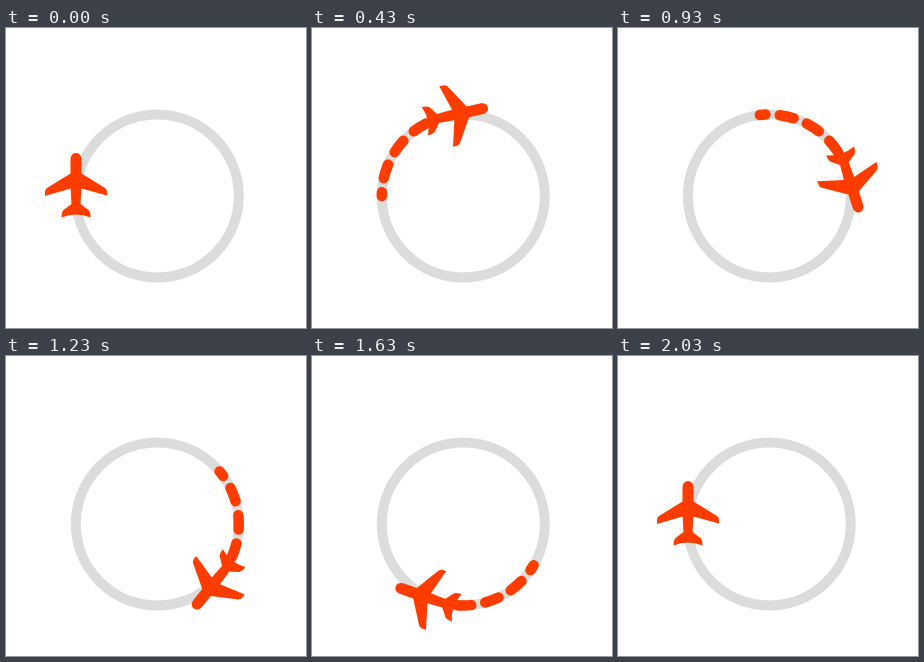
These frames come from a looping animation (300x300 px, 2060 ms). An HTML page:

```html
<!DOCTYPE html>
<html lang="en">
<head>
<meta charset="utf-8">
<title>Plane circling</title>
<style>
  html, body { margin: 0; width: 100%; height: 100%; overflow: hidden; background: #fff; }
  svg { display: block; width: 100%; height: 100%; }
</style>
</head>
<body>
<svg viewBox="0 0 300 300">
  <g fill="none" stroke-width="10">
    <circle cx="151.3" cy="168" r="81.5" stroke="#dcdcdc"/>
  </g>
  <g id="flight">
    <path id="trail" fill="none" stroke="#ff3c00" stroke-width="10.5" stroke-linecap="round"/>
    <path fill="#ff3c00" d="M70 125C73.5 125 75.5 128 75.5 132V145.5L99 160Q101 161.5 101 164V167.5L75.3 160.5
      L74.5 176L82.5 182Q84.5 184 84.5 189.5Q77 186.5 70 186.5Q63 186.5 55.5 189.5Q55.5 184 57.5 182L65.5 176
      L64.7 160.5L39 168V164Q39 161.5 41 160L64.5 145.5V132C64.5 128 66.5 125 70 125Z"/>
  </g>
</svg>
<script>
const CX = 151.3, CY = 168, R = 81.5;
const LOOP = 2060, LAST = 51;
const flight = document.getElementById('flight');
const trail = document.getElementById('trail');

const point = deg => {
  const a = deg * Math.PI / 180;
  return `${CX + R * Math.cos(a)} ${CY + R * Math.sin(a)}`;
};

// Angle where the trail begins: held, then following, then catching up.
function tailAngle(step, turn) {
  if (step <= 41) return Math.max(180, turn + 101);
  const from = 41 * 360 / LAST + 101;
  return from + (540 - from) * (step - 41) / (LAST - 41);
}

function draw(t) {
  // 25 steps per second shown on a 30 per second clock
  const tick = Math.min(61, Math.floor((t + 3.4) * 0.03));
  const step = Math.ceil(tick * 5 / 6 - 0.5);
  const turn = step * 360 / LAST;
  const tail = tailAngle(step, turn) - turn;

  let d = '';
  for (let a = 95; a <= 155; a += 20) {
    const start = Math.max(a, tail), end = a + 10;
    if (start < end) d += `M${point(start)}A${R} ${R} 0 0 1 ${point(end)}`;
  }
  trail.setAttribute('d', d);
  flight.setAttribute('transform', `rotate(${turn} ${CX} ${CY})`);
}

const begin = performance.now();
function loop() {
  draw((performance.now() - begin) % LOOP);
  requestAnimationFrame(loop);
}
loop();
</script>
</body>
</html>
```
